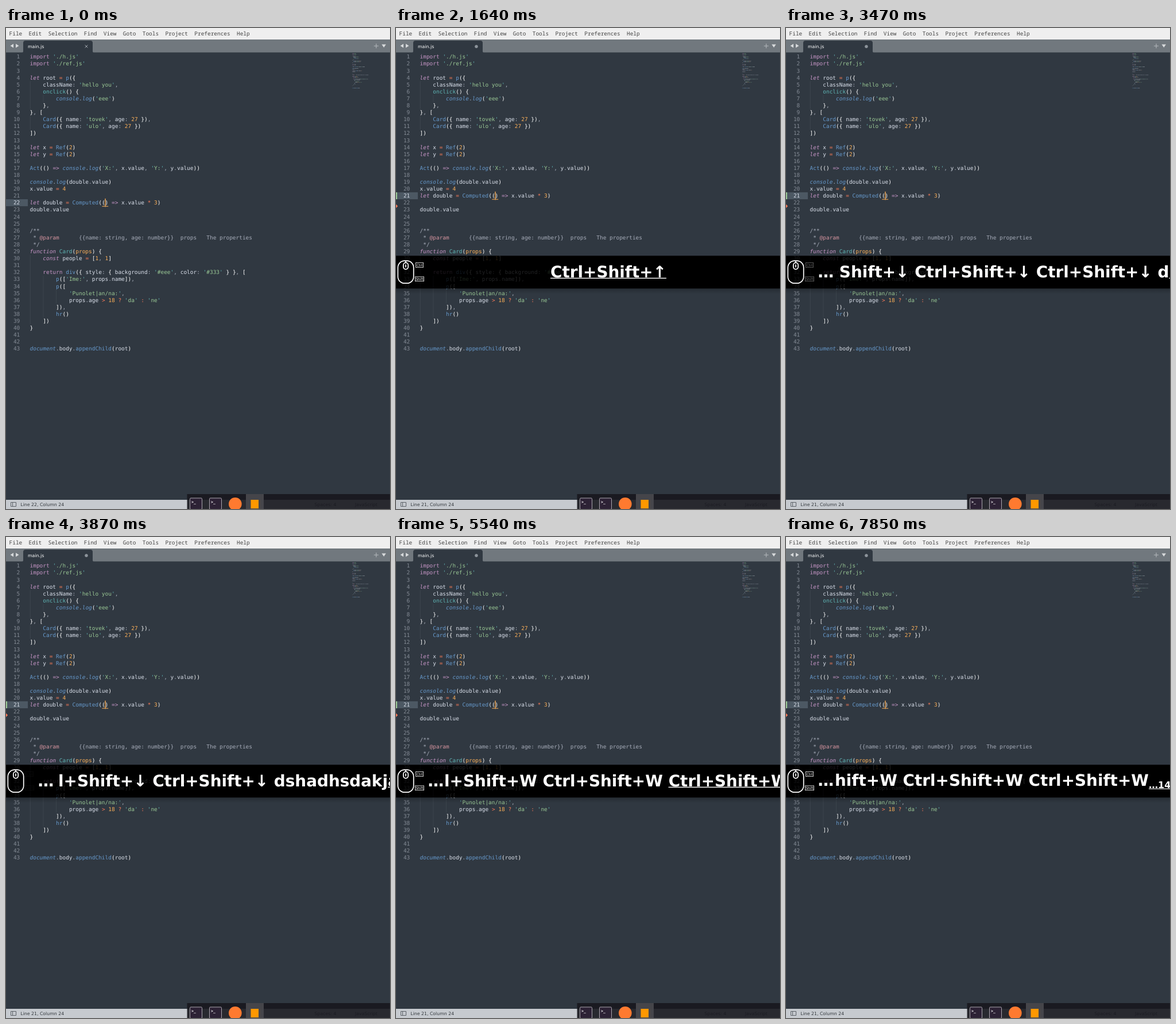
An HTML page that plays this animation: 669 by 837 pixels, repeating every 8 s.

```html
<!DOCTYPE html>
<html lang="en">
<head>
<meta charset="utf-8">
<title>Editor with key overlay</title>
<style>
  html, body { margin: 0; width: 100%; height: 100%; overflow: hidden; background: #303841; }
  svg { display: block; width: 669px; height: 837px; }
  text { text-rendering: geometricPrecision; }
  .code, .num { font: 9.468px "DejaVu Sans Mono", monospace; }
  .num { fill: #848b95; text-anchor: end; }
  .menu { font: 9.45px "Noto Sans Mono", monospace; fill: #444; }
  .ui { font: 7.8px "DejaVu Sans", sans-serif; }
  .key { font: bold 27.86px "DejaVu Sans", sans-serif; fill: #fff; }
  .sub { font-size: 16.12px; }
  .mod text { font: 6px "DejaVu Sans", sans-serif; fill: #fff; text-anchor: middle; }
  .mod rect { fill: none; stroke: #fff; stroke-width: .8; }
  .txt { fill: #d8dee9; }
  .br { fill: #fff; }
  .str { fill: #99c794; }
  .quo { fill: #5fb4b4; }
  .decl { fill: #c695c6; font-style: italic; }
  .kw { fill: #c695c6; }
  .lib { fill: #6699cc; font-style: italic; }
  .fn { fill: #6699cc; }
  .def { fill: #5fb4b4; }
  .arg, .digit { fill: #f9ae58; }
  .op { fill: #f97b58; }
  .pun, .com { fill: #a6acb9; }
  .tag { fill: #d5949f; }
</style>
</head>
<body>
<svg viewBox="0 0 669 837" xmlns="http://www.w3.org/2000/svg">
  <rect width="669" height="837" fill="#303841"/>

  <rect width="669" height="20" fill="#efefef"/>
  <text id="menu" class="menu" x="5.6" y="13.4"></text>

  <rect y="20" width="669" height="22.5" fill="#71787e"/>
  <path d="M28 43q2 0 2-3V26q0-4 4-4h113q4 0 4 4v14q0 3 2 3z" fill="#303841"/>
  <path d="M13 27.5v7l-5.5-3.5zM17 27.5v7l5.5-3.5zM654.5 28.5h7.5l-3.75 5.5z" fill="#d8dadc"/>
  <path d="M641 31.2h8M645 27.2v8" stroke="#b4b8bc" stroke-width="1.1"/>
  <text class="ui" x="38" y="34.8" fill="#fff">main.js</text>

  <g id="editor">
    <g id="before"></g>
    <g id="after"></g>
  </g>

  <rect y="821" width="669" height="16" fill="#c6cacf"/>
  <path d="M8.5 825.5h9v7h-9zM11.5 825.5v7" fill="none" stroke="#5a6066"/>
  <text id="status" class="ui" x="25.3" y="832" fill="#33383d"></text>
  <text class="ui" x="537.5" y="832" fill="#33383d">Spaces: 4</text>
  <text class="ui" x="608" y="832" fill="#33383d">JavaScript</text>
  <rect x="315.5" y="811" width="353.5" height="26" fill="#18181e" fill-opacity=".9"/>
  <rect x="418" y="811" width="31" height="26" fill="#45454a"/>
  <g id="terms"></g>
  <circle cx="399.3" cy="828.3" r="11.3" fill="#ff7a30"/>
  <rect x="426.5" y="821" width="13.5" height="15" fill="#ff9800"/>

  <g id="bar">
    <linearGradient id="shade" x2="0" y2="1">
      <stop stop-color="#000" stop-opacity=".22"/>
      <stop offset="1" stop-color="#000" stop-opacity="0"/>
    </linearGradient>
    <clipPath id="strip"><rect y="396.3" width="669" height="57"/></clipPath>
    <rect y="453" width="669" height="10" fill="url(#shade)"/>
    <rect y="396.3" width="669" height="57"/>
    <g clip-path="url(#strip)"><use href="#editor" opacity=".15"/></g>
    <g fill="none" stroke="#fff" stroke-width="1.7">
      <rect x="3.3" y="405.2" width="27.4" height="39" rx="11.5"/>
      <rect x="12.8" y="408.3" width="8.4" height="11.5" rx="4.2"/>
      <path d="M17 405v3.3M17 411.5v5"/>
    </g>
    <g id="ctrl" class="mod"><rect x="34.4" y="408.4" width="13.2" height="8"/><text x="41" y="414.6">Ctrl</text></g>
    <g id="shift" class="mod"><rect x="33.4" y="432.9" width="15.2" height="7.7"/><text x="41" y="439">Shift</text></g>
    <g id="label">
      <text id="dots" class="key" x="55.6">…</text>
      <text id="head" class="key"></text>
      <text id="last" class="key"></text>
      <rect id="line" fill="#fff"/>
    </g>
  </g>
</svg>

<script>
const $ = id => document.getElementById(id);
const LOOP = 8000;
const SWAP = 1640;

// ---------- editor ----------
const LEFT = 41.5, PITCH = 5.7, ROW = 12.095;
const MID = n => 50 + ROW * (n - 1);

const source = `import './h.js'
import './ref.js'

let root = p({
    className: 'hello you',
    onclick() {
        console.log('eee')
    },
}, [
    Card({ name: 'tovek', age: 27 }),
    Card({ name: 'ulo', age: 27 })
])

let x = Ref(2)
let y = Ref(2)

Act(() => console.log('X:', x.value, 'Y:', y.value))

console.log(double.value)
x.value = 4

let double = Computed(() => x.value * 3)
double.value


/**
 * @param      {{name: string, age: number}}  props   The properties
 */
function Card(props) {
    const people = [1, 1]

    return div({ style: { background: '#eee', color: '#333' } }, [
        p(['Ime:', props.name]),
        p([
            'Punolet|an/na:',
            props.age > 18 ? 'da' : 'ne'
        ]),
        hr()
    ])
}


document.body.appendChild(root)`.split('\n');

const syntax = new RegExp([
  "(?<str>'[^']*')",
  '(?<decl>\\b(?:let|const|function)\\b)',
  '(?<kw>\\b(?:import|return)\\b|=>)',
  '(?<lib>\\b(?:console|log|document)\\b)',
  '(?<def>onclick|Card(?=\\(props))',
  '(?<arg>props(?=\\) \\{))',
  '(?<fn>[a-z]\\w*(?=\\())',
  '(?<digit>\\b\\d+)',
  '(?<op>[=*>?]|(?<= ):)',
  '(?<br>[()[\\]{}]+)',
  '(?<pun>[.,:])',
  '(?<txt>\\w+)'
].join('|'), 'gi');
const comment = /(?<tag>@param)|(?<com>\S+)/g;

function tokens(line) {
  const out = [];
  for (const m of line.matchAll(/^( \*|\/\*)/.test(line) ? comment : syntax)) {
    const kind = Object.keys(m.groups).find(k => m.groups[k] !== undefined);
    const s = m[0], at = m.index;
    if (kind !== 'str') { out.push([at, s, kind]); continue; }
    out.push([at, "'", 'quo'], [at + 1, s.slice(1, -1), 'str'], [at + s.length - 1, "'", 'quo']);
  }
  return out;
}

// Indent guides: [column, first line, last line]
const guides = [[0, 5, 8], [0, 10, 11], [0, 30, 39], [4, 7, 7], [4, 33, 38], [8, 35, 36]];

function editor(lines, cur) {
  let s = `<rect y="${MID(cur) - 6}" width="38" height="12.1" fill="#4c5863"/>`;
  for (const [col, a, b] of guides)
    s += `<rect x="${LEFT + .3 + col * PITCH}" y="${MID(a) - 6}" width=".7" height="${(b - a + 1) * ROW}" fill="#424b54"/>`;
  lines.forEach((line, i) => {
    const n = i + 1, y = MID(n) + 3.4;
    s += `<text class="num" x="24.3" y="${y}"${n === cur ? ' style="fill:#d8dee9"' : ''}>${n}</text>`;
    for (const [col, str, kind] of tokens(line)) {
      s += `<text class="code ${kind}" x="${LEFT + col * PITCH}" y="${y}">${str}</text>`;
      s += `<rect class="${kind}" x="${603.5 + col * .41}" y="${44.2 + i * 1.43}" width="${str.length * .41}" height=".8" opacity=".45"/>`;
    }
  });
  const y = MID(cur);
  return s + `<path d="M167.4 ${y + 6.3}h4.6M173.6 ${y + 6.3}h4.6" stroke="#f9ae58"/>
    <rect x="172.3" y="${y - 7.2}" width="1.4" height="14.6" fill="#f9ae58"/>`;
}

const moved = source.slice();
[moved[20], moved[21]] = [moved[21], moved[20]];
$('before').innerHTML = editor(source, 22) +
  '<path d="M137.6 29.6l4.8 4.8m0-4.8l-4.8 4.8" stroke="#a3a9b0"/>';
$('after').innerHTML = editor(moved, 21) +
  `<circle cx="140" cy="32.2" r="2.7" fill="#8d949b"/>
   <rect y="${MID(21) - 6}" width="2" height="12.1" fill="#99c794"/>
   <path d="M0 306.8l3.2 3.2-3.2 3.2z" fill="#f97b58"/>`;

$('menu').textContent = 'File Edit Selection Find View Goto Tools Project Preferences Help'
  .replace(/ /g, '\u00a0\u00a0');
$('terms').innerHTML = [320.5, 354.5].map(x =>
  `<rect x="${x}" y="818" width="21" height="19.5" rx="1.5" fill="#2d2235" stroke="#aaa5ae"/>
   <text x="${x + 2.5}" y="826.5" style="font:bold 6.5px 'DejaVu Sans Mono',monospace" fill="#fff">&gt;_</text>`).join('');

// ---------- key overlay ----------
const GAP = '\u00a0';
const combo = k => GAP + 'Ctrl+Shift+' + k;
const UP = combo('↑'), DOWN = combo('↓'), CLOSE = combo('W');
const RIGHT = 684, CENTER = 370, ROOM = 628, CUT = 601;

const presses = [
  ...[1640, 1970, 2220, 2390].map(t => [t, UP]),
  ...[2640, 2810, 2940].map(t => [t, DOWN]),
  [3310, GAP + 'd'], [3430, 's'],
  ...[...'hadhsdakjash'].map((c, i) => [3510 + 40 * i, c]),
  [4110, 'dj'],
  ...[4790, 5080, 5290, 5540, 5750, 5960, 6270, 6530, 6700, 6990, 7240, 7450, 7630, 7850].map(t => [t, CLOSE])
];
// Moments when the underline of the latest key drops
const drops = [1850, 2180, 2600, 3150, 4280, 5000, 5500, 6190, 6490, 6910, 7200];

const width = el => el.textContent ? el.getComputedTextLength() : 0;

function place(el, attrs) {
  for (const k in attrs) el.setAttribute(k, attrs[k]);
}

function showKeys(keys, lined) {
  $('label').style.display = keys.length ? '' : 'none';
  if (!keys.length) return;
  const head = $('head'), last = $('last');
  const repeats = keys.filter(k => k === CLOSE).length;
  const counted = repeats >= 7;
  let before, tail = keys[keys.length - 1];
  if (counted) {
    before = CLOSE.repeat(3);
    tail = `…${repeats}×`;
  } else {
    before = keys.slice(0, -1).join('');
    if (tail[0] === GAP) { before += GAP; tail = tail.slice(1); }
  }
  before = before.slice(1);
  last.setAttribute('class', counted ? 'key sub' : 'key');
  head.textContent = before;
  last.textContent = tail;
  const end = width(last);
  const long = counted || width(head) + end > ROOM;
  while (long && before && width(head) + end > CUT) head.textContent = before = before.slice(1);
  const right = long ? RIGHT : CENTER + (width(head) + end) / 2;
  const y = counted ? 433 : 434;
  $('dots').style.display = long ? '' : 'none';
  $('line').style.display = lined ? '' : 'none';
  place($('dots'), { y });
  place(head, { x: right - end - width(head), y });
  place(last, { x: right - end, y: counted ? 437 : y });
  place($('line'), { x: right - end, y: counted ? 437.7 : 434.7, width: end, height: counted ? 1.1 : 1.4 });
}

// ---------- timeline ----------
const held = (t, from) => {
  if (t < from) return 0;
  if (t < 3150 || t >= 4450) return 1;
  return Math.max(0, 1 - (t - 3150) / 900) ** 2;
};

let shown = '';
function render(t) {
  $('ctrl').style.opacity = held(t, 520);
  $('shift').style.opacity = held(t, 310);
  const done = presses.filter(p => p[0] <= t);
  const latest = done.length ? done[done.length - 1][0] : 0;
  const lined = !drops.some(d => d <= t && d > latest);
  const state = [t >= 310, done.length, lined].join();
  if (state === shown) return;
  shown = state;
  const swapped = t >= SWAP;
  $('before').style.display = swapped ? 'none' : '';
  $('after').style.display = swapped ? '' : 'none';
  $('status').textContent = `Line ${swapped ? 21 : 22}, Column 24`;
  $('bar').style.display = t >= 310 ? '' : 'none';
  showKeys(done.map(p => p[1]), lined);
}

const start = performance.now();
function tick() {
  render((performance.now() - start) % LOOP);
  requestAnimationFrame(tick);
}
tick();
</script>
</body>
</html>
```
